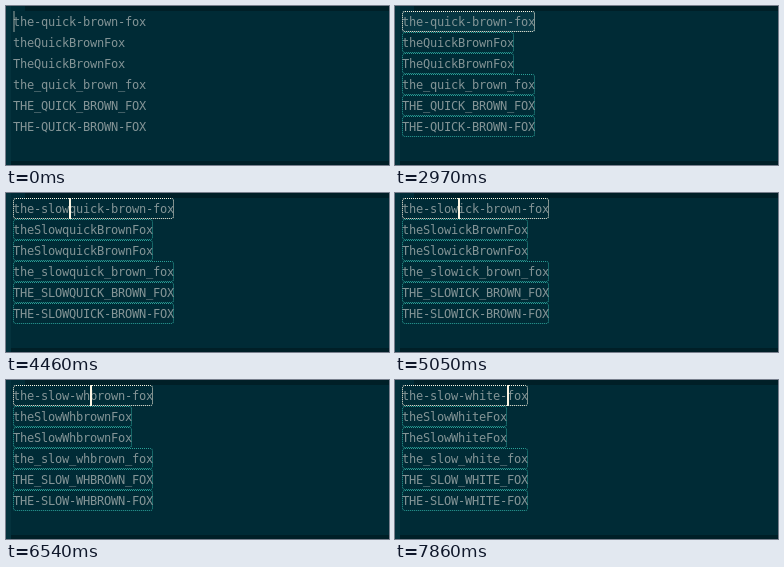
Recreate the animation shown at these times as an HTML page. Size 383 by 159 pixels, loop 8000 ms.

```html
<!DOCTYPE html>
<html lang="en">
<head>
<meta charset="utf-8">
<title>Case-aware editing</title>
<style>
html, body { margin: 0; width: 100%; height: 100%; overflow: hidden; background: #002b36; }
#stage { position: relative; width: 383px; height: 159px; overflow: hidden; }
#stage div { position: absolute; box-sizing: border-box; }
.gutter { left: 0; top: 0; width: 5px; height: 159px; background: #04323d; }
.tabs { left: 19px; top: 0; width: 364px; height: 5px; background: #001f27; }
.status { left: 5px; top: 155px; width: 378px; height: 4px; background: #001f27; }
.text {
  left: 7px; font: 12px/20px "DejaVu Sans Mono", monospace;
  letter-spacing: calc(7px - 1ch); white-space: pre; color: #839496;
}
.box { left: 7px; height: 21px; border: 1px dotted #2aa198; border-radius: 3px; }
.box.main { border-color: #fdf6e3; }
#selection { left: 7px; top: 5px; height: 21px; background: #073642; }
#cursor { top: 5px; width: 2px; height: 21px; background: #fdf6e3; }
</style>
</head>
<body>
<div id="stage">
  <div class="gutter"></div>
  <div class="tabs"></div>
  <div class="status"></div>
  <div id="selection"></div>
  <div id="cursor" style="z-index: 1"></div>
</div>
<script>
const LOOP = 8000, TICKS = 54, LEFT = 7, TOP = 5, CHAR = 7, ROW = 21;
const $ = id => document.getElementById(id);

function add(className, top) {
  const node = document.createElement("div");
  node.className = className;
  node.style.top = top + "px";
  return $("stage").appendChild(node);
}

const title = w => w.charAt(0).toUpperCase() + w.slice(1);
const pascal = words => words.map(title).join("");
const styles = [
  words => words.join("-"),
  words => words[0] + pascal(words.slice(1)),
  pascal,
  words => words.join("_"),
  words => words.join("_").toUpperCase(),
  words => words.join("-").toUpperCase()
];
const boxTicks = [6, 7, 9, 11, 13, 15];

// tick, cursor column, second word, third word
const edits = [
  [0, 0, "quick", "brown"], [1, 3], [2, 9], [3, 15], [4, 19],
  [21, 0], [22, 1], [23, 3], [24, 4],
  [27, 5, "squick"], [29, 6, "slquick"], [30, 8, "slowquick"],
  [33, 8, "slowuick"], [34, 8, "slowick"], [35, 8, "slowck"], [36, 8, "slowk"], [37, 8, "slow"],
  [39, 9],
  [42, 10, "slow", "wbrown"], [44, 11, "slow", "whbrown"],
  [45, 12, "slow", "whibrown"], [46, 14, "slow", "whitebrown"],
  [48, 14, "slow", "whiterown"], [49, 14, "slow", "whiteown"],
  [50, 14, "slow", "whiten"], [51, 14, "slow", "white"], [53, 15]
];

const rows = styles.map((style, i) => ({
  style,
  box: add(i ? "box" : "box main", TOP + i * ROW),
  text: add("text", TOP + i * ROW + 1)
}));

// Smooth blink, one second per cycle
function cursorAlpha(tick) {
  if (tick === 0) return .3;
  if (tick < 8 || tick > 20) return 1;
  const phase = (tick * LOOP / TICKS + 400) % 1000;
  const away = Math.min(phase, 1000 - phase);
  return Math.max(0, Math.min(1, (300 - away) / 200));
}

function draw(time) {
  const tick = Math.floor(time % LOOP * TICKS / LOOP);
  let col, second, third;
  for (const [start, c, a, b] of edits) {
    if (start > tick) break;
    col = c;
    second = a || second;
    third = b || third;
  }
  rows.forEach(({ style, box, text }, i) => {
    const line = style(["the", second, third, "fox"]);
    if (text.textContent !== line) text.textContent = line;
    box.style.width = line.length * CHAR + "px";
    box.style.visibility = tick < boxTicks[i] ? "hidden" : "visible";
  });
  $("selection").style.width = (tick < 21 ? col * CHAR : 0) + "px";
  $("cursor").style.left = LEFT + col * CHAR + "px";
  $("cursor").style.opacity = cursorAlpha(tick);
}

const begin = performance.now();
function loop() {
  draw(performance.now() - begin);
  requestAnimationFrame(loop);
}
loop();
</script>
</body>
</html>
```
